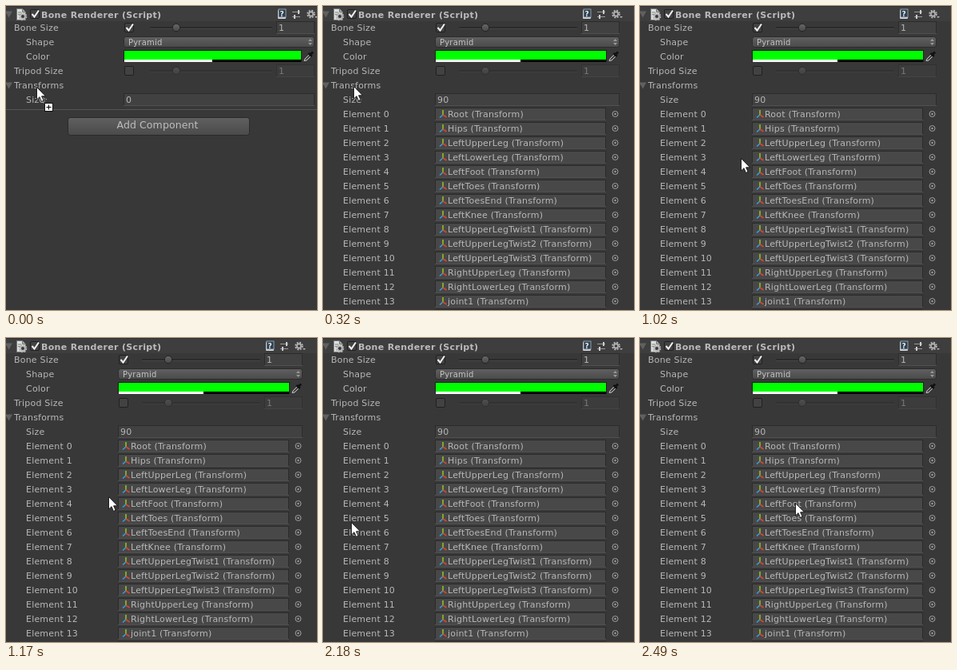
Write an HTML page that moves like this. It is 389 px wide and 380 px high and loops after 2.57 s.

```html
<!DOCTYPE html>
<html lang="en">
<head>
<meta charset="utf-8">
<title>Bone Renderer inspector</title>
<style>
  html, body { margin: 0; width: 100%; height: 100%; overflow: hidden; background: #383838; }
  svg { display: block; width: 100vw; height: 100vh; }
  text { font: 11px "DejaVu Sans", sans-serif; letter-spacing: .2px; fill: #b8b8b8; white-space: pre; }
  .title { font-weight: bold; letter-spacing: .33px; fill: #bcbcbc; }
  .popup { font-size: 10px; letter-spacing: .2px; fill: #c4c4c4; }
  .button { font-size: 12.5px; letter-spacing: .1px; fill: #bebebe; }
  .off { opacity: .5; }
</style>
</head>
<body>
<svg id="stage" viewBox="0 0 389 380" xmlns="http://www.w3.org/2000/svg">
  <defs>
    <linearGradient id="raised" x2="0" y2="1">
      <stop stop-color="#606060"/><stop offset="1" stop-color="#4a4a4a"/>
    </linearGradient>
    <linearGradient id="knob" x2="0" y2="1">
      <stop stop-color="#686868"/><stop offset="1" stop-color="#484848"/>
    </linearGradient>
  </defs>
</svg>
<script>
const LOOP = 2570;
const stage = document.getElementById('stage');

function add(parent, tag, attrs = {}, content) {
  const node = document.createElementNS('http://www.w3.org/2000/svg', tag);
  for (const key in attrs) node.setAttribute(key, attrs[key]);
  if (content !== undefined) node.textContent = content;
  parent.append(node);
  return node;
}
const group = (p, x = 0, y = 0, cls = '') => add(p, 'g', { transform: `translate(${x} ${y})`, class: cls });
const rect = (p, x, y, width, height, fill, more) => add(p, 'rect', { x, y, width, height, fill, ...more });
const path = (p, d, fill, stroke = 'none', width = 1) =>
  add(p, 'path', { d, fill, stroke, 'stroke-width': width });
const text = (p, x, mid, content, cls = '') => add(p, 'text', { x, y: mid + 4, class: cls }, content);

function field(p, left, right, mid, fill = '#414141') {
  rect(p, left + .5, mid - 7.5, right - left - 1, 15, fill, { stroke: '#2b2b2b' });
  rect(p, left, mid + 7, right - left, 1, '#505050');
}

function checkbox(p, x, mid, checked) {
  rect(p, x - 5.5, mid - 5.5, 11, 11, '#424242', { stroke: '#202020', rx: 1.5 });
  if (checked) path(p, `M${x - 3.5} ${mid}l3 3.5l5.5-8`, 'none', '#f0f0f0', 2);
}

const foldout = (p, mid) => path(p, `M-1 ${mid - 3.5}h9l-4.5 8z`, '#606060');

function gear(p, x, y) {
  add(p, 'circle', { cx: x, cy: y, r: 4.3, fill: 'none', stroke: '#b5b5b5', 'stroke-width': 2,
    'stroke-dasharray': '2 1.38' });
  add(p, 'circle', { cx: x, cy: y, r: 2.6, fill: 'none', stroke: '#b5b5b5', 'stroke-width': 1.6 });
}

function header(p, right) {
  rect(p, 0, 0, 389, 19, '#3e3e3e');
  rect(p, 0, 0, 389, 1, '#303030');
  foldout(p, 10);
  path(p, 'M13.5 3.5h7l4 4v10h-11z', '#dedede', '#777');
  path(p, 'M20.5 3.5v4h4', '#aaa', '#777');
  path(p, 'M15 8h4M15 10.500h3', 'none', '#6a8a6a');
  gear(group(p, 21, 13), 0, 0);
  add(p, 'circle', { cx: 21, cy: 13, r: 2, fill: '#383838' });
  checkbox(p, 36, 10, true);
  text(p, 44, 10.5, 'Bone Renderer (Script)', 'title');

  const icons = group(p, right, 0);
  rect(icons, -46, 5, 10, 11, '#d5d5d5', { rx: 1 });
  rect(icons, -45, 4, 9, 10, '#2d4052', { stroke: '#a9b4bd', 'stroke-width': .8 });
  add(icons, 'text', { x: -43.5, y: 12.5, style: 'font:bold 9px "DejaVu Sans",sans-serif;fill:#eee' }, '?');
  path(icons, 'M-28 7.500h10M-28 13.500h10', 'none', '#999');
  path(icons, 'M-20 5v5M-25 11v5', 'none', '#ccc', 2);
  gear(icons, -4.5, 10);
  path(icons, 'M0 13h4l-2 2z', '#b5b5b5');
}

function sliderRow(p, m, mid, label, on) {
  text(p, 10, mid, label);
  checkbox(p, m.left + 7, mid, on);
  const g = group(p, 0, 0, on ? '' : 'off');
  rect(g, m.knob - 33, mid - 1, m.number - 5 - m.knob + 33, 2, '#2b2b2b', { rx: 1 });
  rect(g, m.knob - 33, mid + 1, m.number - 5 - m.knob + 33, 1, '#464646');
  add(g, 'circle', { cx: m.knob, cy: mid, r: 4.7, fill: 'url(#knob)', stroke: '#242424' });
  field(g, m.number, m.right, mid);
  text(g, m.number + 3, mid, '1');
}

function popupRow(p, m) {
  text(p, 25, 45, 'Shape');
  rect(p, m.left + .5, 38.5, m.right - m.left - 1, 13, 'url(#raised)', { rx: 3, stroke: '#2c2c2c' });
  text(p, m.left + 6, 44.5, 'Pyramid', 'popup');
  path(p, `M${m.right - 8} 44l2.500-3l2.500 3zm0 2h5l-2.500 3z`, '#999');
}

function colorRow(p, m) {
  const end = m.right - 17;
  text(p, 25, 63, 'Color');
  rect(p, m.left, 55, end - m.left + 1, 15, '#202020');
  rect(p, m.left + 1, 56, end - m.left - 1, 11, '#0f0');
  rect(p, m.left + 1, 67, end - m.left - 1, 3, '#000');
  rect(p, m.left + 1, 67, m.alpha - m.left - 1, 3, '#fff');
  const g = group(p, m.right - 14, 57);
  path(g, 'M1 11.500l1-2.500l6-6l2 2l-6 6z', '#454545', '#c8c8c8');
  path(g, 'M6.500 2l4 4M9 3.500l3-3', 'none', '#111', 3);
}

function inspector(m, count) {
  const p = group(stage);
  header(p, m.right);
  sliderRow(p, m, 27, 'Bone Size', true);
  popupRow(p, m);
  colorRow(p, m);
  sliderRow(p, m, 81, 'Tripod Size', false);
  foldout(p, 99);
  text(p, 10, 99, 'Transforms');
  text(p, 25, 117, 'Size');
  field(p, m.left, m.right, 117);
  text(p, m.left + 3, 117, count);
  return p;
}

function element(p, m, name, i) {
  const mid = 135 + 18 * i;
  text(p, 25, mid, 'Element ' + i);
  field(p, m.left, m.right - 17, mid, '#484848');
  const g = group(p, 150, mid + 1);
  path(g, 'M0 0V-6', 'none', '#8fc31f', 1.6);
  path(g, 'M0 0l-4 3.500', 'none', '#3d9be0', 1.6);
  path(g, 'M0 0l4.500 3', 'none', '#d8452e', 1.6);
  text(p, 156, mid, name + ' (Transform)');
  add(p, 'circle', { cx: 365.5, cy: mid, r: 3.5, fill: 'none', stroke: '#a0a0a0' });
  add(p, 'circle', { cx: 365.5, cy: mid, r: 1.2, fill: '#a0a0a0' });
}

const wide = { left: 147, right: 386, knob: 213, number: 338, alpha: 258 };
const narrow = { left: 140, right: 371, knob: 203, number: 323, alpha: 247 };

const empty = inspector(wide, '0');
rect(empty, 0, 129, 389, 1, '#555');
rect(empty, 77.5, 139.5, 227, 22, 'url(#raised)', { rx: 3, stroke: '#2a2a2a' });
add(empty, 'text', { x: 189.5, y: 153, class: 'button', 'text-anchor': 'middle' }, 'Add Component');

const filled = inspector(narrow, '90');
['Root', 'Hips', 'LeftUpperLeg', 'LeftLowerLeg', 'LeftFoot', 'LeftToes', 'LeftToesEnd', 'LeftKnee',
 'LeftUpperLegTwist1', 'LeftUpperLegTwist2', 'LeftUpperLegTwist3', 'RightUpperLeg', 'RightLowerLeg',
 'joint1'].forEach((name, i) => element(filled, narrow, name, i));
rect(filled, 140, 379, 214, 1, '#2b2b2b');

const cursor = add(stage, 'g');
const badge = add(cursor, 'g');
add(badge, 'path', { d: 'M3 13l3 5h5M5 12l8 4M4 15l6 6', fill: 'none', stroke: '#ddd', 'stroke-dasharray': '1 1' });
rect(badge, 10.5, 20.5, 10, 10, '#fff', { stroke: '#111' });
path(badge, 'M12.500 25.500h6M15.500 22.500v6', 'none', '#000');
path(cursor, 'M.5 .5v15.500l3.500-3.300l2.500 5.800l2.600-1.200l-2.500-5.500h4.900z', '#fff', '#111', .9);

// Each step is [start in ms, style]; values hold until the next step.
function play(node, steps) {
  const frames = steps.map(([at, style]) => ({ offset: at / LOOP, easing: 'steps(1, end)', ...style }));
  frames.push({ ...frames[frames.length - 1], offset: 1 });
  node.animate(frames, { duration: LOOP, iterations: Infinity });
}
const show = { visibility: 'visible' }, hide = { visibility: 'hidden' };
const at = (x, y) => ({ transform: `translate(${x}px, ${y}px)`, ...show });

play(empty, [[0, show], [320, hide]]);
play(filled, [[0, hide], [320, show]]);
play(badge, [[0, show], [320, hide]]);
play(cursor, [
  [0, at(38, 101)], [150, at(38, 100)],
  [870, at(74, 138)], [950, at(111, 176)], [1020, at(126, 190)],
  [1100, at(128, 198)], [1180, at(112, 202)], [1250, at(72, 202)],
  [1330, { ...at(35, 231), ...hide }],
  [2180, at(35, 230)], [2260, at(84, 231)], [2340, at(140, 222)], [2410, at(178, 211)], [2490, at(194, 206)]
]);
</script>
</body>
</html>
```
